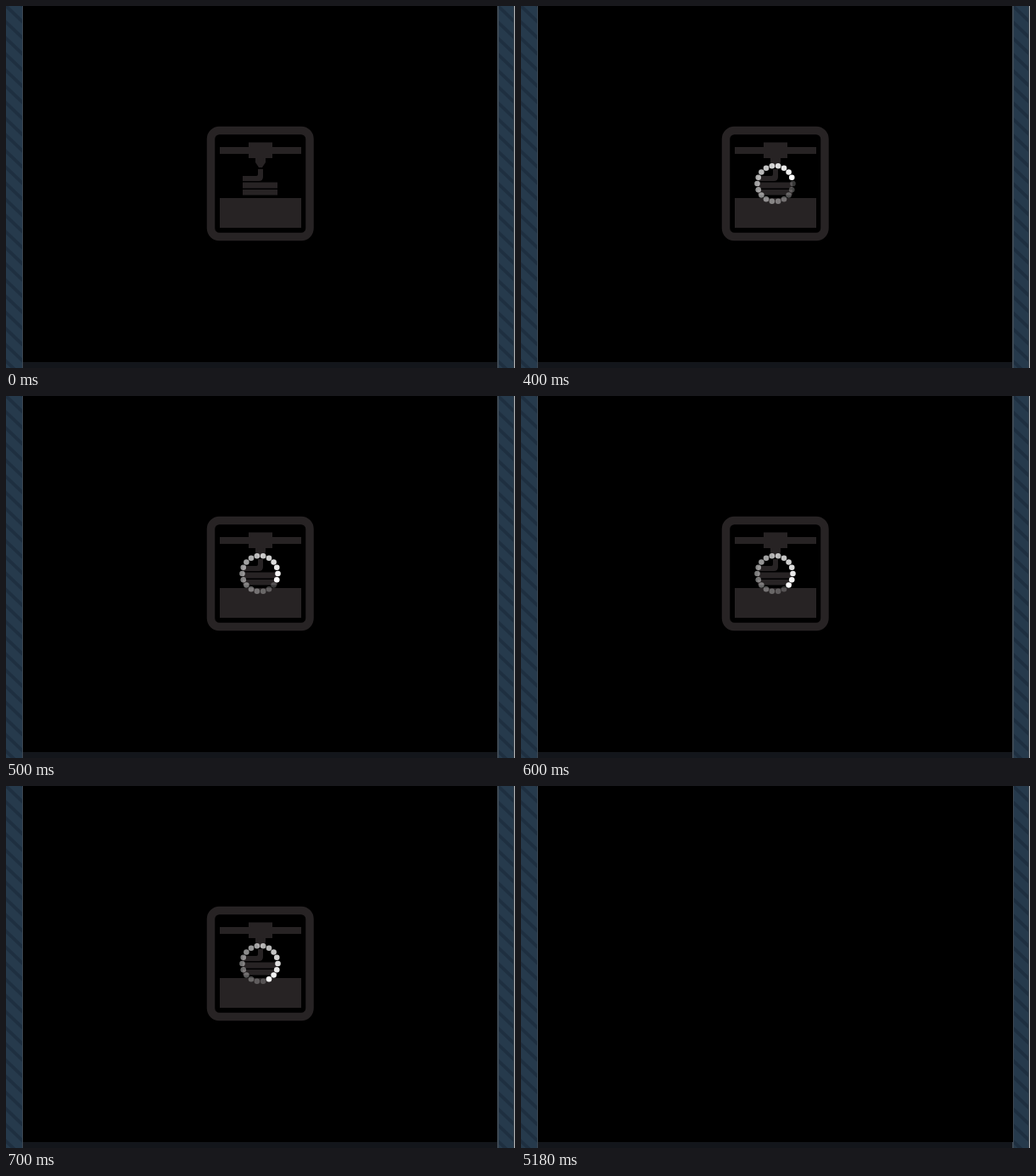
Write an HTML page that moves like this. It is 600x426 px and loops after 8100 ms.

```html
<!DOCTYPE html>
<html lang="en">
<head>
<meta charset="utf-8">
<title>Printer loading</title>
<style>
  html, body { margin: 0; width: 100%; height: 100%; overflow: hidden; background: #000; }
  svg { display: block; width: 600px; height: 426px; }
</style>
</head>
<body>
<svg viewBox="0 0 600 426">
  <defs>
    <pattern id="stripes" width="20" height="19" patternUnits="userSpaceOnUse">
      <rect width="20" height="19" fill="#263a4c"/>
      <path d="M-20-19 40 38M-20 0 20 38M0-19 40 19" stroke="#1e2f40" stroke-width="4"/>
    </pattern>
  </defs>
  <rect width="600" height="426" fill="url(#stripes)"/>
  <rect x="598" width="1" height="426" fill="#36424d"/>
  <rect x="599" width="1" height="426" fill="#b4b6b8"/>
  <rect x="19" width="562" height="426" fill="#3d4954"/>
  <rect x="20" width="559" height="426"/>
  <rect x="20" y="419" width="559" height="7" fill="#13161b"/>
  <rect id="edge" x="579" width="1" height="419"/>

  <g id="printer" fill="#272324">
    <rect x="241.5" y="146.5" width="116.5" height="125" rx="10" fill="none" stroke="#272324" stroke-width="9.5"/>
    <path d="M252 166H286V160.500H314V166H348V174H314V179H306V184L302 190H298L294 184V179H286V174H252Z"/>
    <path d="M297 192H303V201Q303 206 298 206H279V200H295Q297 200 297 198Z"/>
    <path d="M279 207.500H320V214.500H279ZM279 216H320V222.500H279ZM252 226H348V261H252Z"/>
  </g>
  <g id="spinner" fill="#fff"></g>
</svg>
<script>
  const LOOP = 8100, DOTS = 18;
  const HEADS = [-1, 1, 2, 3];
  const [edge, printer, spinner] = ["edge", "printer", "spinner"].map(id => document.getElementById(id));

  const dots = Array.from({ length: DOTS }, (_, i) => {
    const angle = i * 2 * Math.PI / DOTS;
    const dot = document.createElementNS("http://www.w3.org/2000/svg", "circle");
    dot.setAttribute("cx", 299.5 + 21 * Math.cos(angle));
    dot.setAttribute("cy", 209 + 21 * Math.sin(angle));
    dot.setAttribute("r", 3.3);
    return spinner.appendChild(dot);
  });

  const show = (element, visible) => element.setAttribute("visibility", visible ? "visible" : "hidden");
  const start = performance.now();

  function draw() {
    const time = (performance.now() - start) % LOOP;
    const spinning = time >= 400 && time < 800;
    show(printer, time < 800);
    show(edge, time >= 800);
    show(spinner, spinning);
    if (spinning) {
      const head = HEADS[Math.floor((time - 400) / 100)];
      dots.forEach((dot, i) => {
        const age = (head - i + DOTS) % DOTS;
        dot.setAttribute("fill-opacity", 1 - 0.046 * age);
      });
    }
    requestAnimationFrame(draw);
  }
  draw();
</script>
</body>
</html>
```
